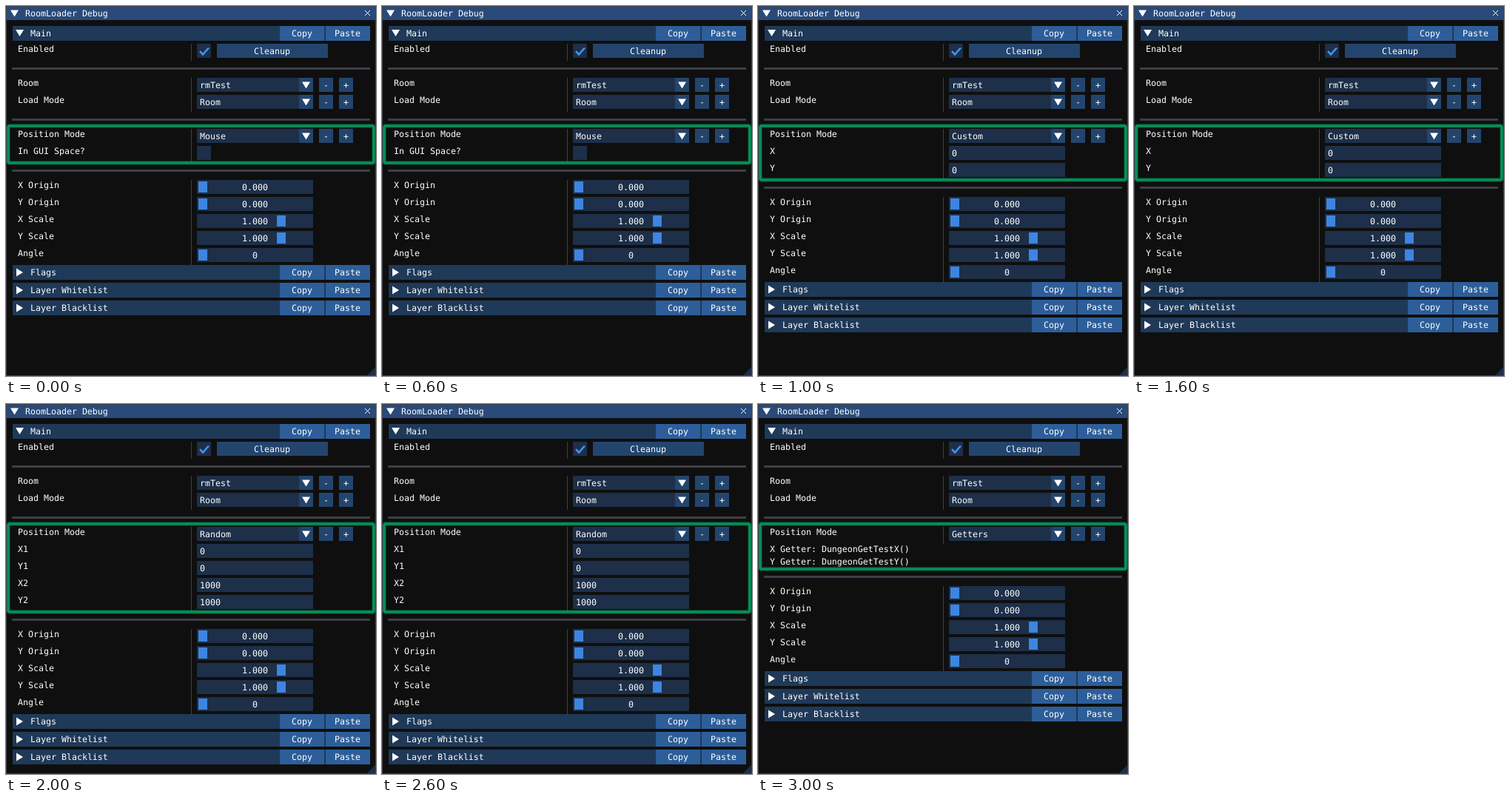
Recreate the animation shown at these times as an HTML page. Size 500 px wide and 500 px high, loop 4000 ms.

```html
<!DOCTYPE html>
<html lang="en">
<head>
<meta charset="utf-8">
<title>Debug panel</title>
<style>
  html, body { margin: 0; width: 100%; height: 100%; overflow: hidden; background: #0f0f0f; }
  svg { display: block; width: 500px; height: 500px; }
  text {
    font: 11.627px "DejaVu Sans Mono", "Liberation Mono", monospace;
    fill: #fff; white-space: pre; text-rendering: geometricPrecision;
  }
</style>
</head>
<body>
<svg id="stage" viewBox="0 0 500 500"></svg>
<script>
const LOOP = 4000;
const C = {
  bg: '#0f0f0f', title: '#294a7a', line: '#3e3e47', header: '#1f3958', tool: '#2d5e99',
  frame: '#1d2f49', button: '#23456d', grab: '#3d85e0', check: '#4296fa', mark: '#05935a'
};
const stage = document.getElementById('stage');

function add(parent, tag, attrs, content) {
  const el = document.createElementNS('http://www.w3.org/2000/svg', tag);
  for (const k in attrs) el.setAttribute(k, attrs[k]);
  if (content !== undefined) el.textContent = content;
  parent.appendChild(el);
  return el;
}
const group = parent => add(parent, 'g', {});
const rect = (p, x, y, width, height, fill) => add(p, 'rect', { x, y, width, height, fill });
const text = (p, x, y, s) => add(p, 'text', { x, y }, s);
const path = (p, d, attrs) => add(p, 'path', { d, fill: '#fff', ...attrs });

const downArrow = (p, x, y) => path(p, `M${x} ${y}h11l-5.5 9z`);
const rightArrow = (p, x, y) => path(p, `M${x} ${y}v11l9-5.5z`);
const label = (p, y, s) => text(p, 16, y + 11, s);
const divider = (p, y) => rect(p, 8, y, 484, 3, C.line);
const column = (p, y, end) => rect(p, 250, y, 1, end - y, C.line);

function button(p, x, y, w, h, s, fill) {
  rect(p, x, y, w, h, fill);
  text(p, Math.floor(x + (w - s.length * 7) / 2), y + 14, s);
}

function header(p, y, s, open) {
  rect(p, 9, y, 483, 20, C.header);
  if (open) downArrow(p, 13, y + 5);
  else rightArrow(p, 14, y + 4.5);
  text(p, 33, y + 14, s);
  button(p, 370, y, 60, 20, 'Copy', C.tool);
  button(p, 432, y, 60, 20, 'Paste', C.tool);
}

function field(p, y, name, value) {
  label(p, y, name);
  rect(p, 258, y, 157, 19, C.frame);
  text(p, 262, y + 14, value);
}

function combo(p, y, name, value) {
  field(p, y, name, value);
  rect(p, 396, y, 19, 19, C.button);
  downArrow(p, 400, y + 5.5);
  button(p, 423, y, 19, 19, '-', C.button);
  button(p, 450, y, 19, 19, '+', C.button);
}

function slider(p, y, name, value, grabX) {
  label(p, y, name);
  rect(p, 258, y, 157, 19, C.frame);
  rect(p, grabX, y + 2, 12, 15, C.grab);
  text(p, 336.5 - value.length * 3.5, y + 14, value);
}

function checkbox(p, y, name, on) {
  label(p, y, name);
  rect(p, 258, y, 19, 19, C.frame);
  if (on) path(p, `M262 ${y + 10}l4 4.5l8-9`, { fill: 'none', stroke: C.check, 'stroke-width': 2.5 });
}

// Each mode lists its own rows and how far they push the rest down.
const modes = [
  { name: 'Mouse', shift: 0, end: 212, rows: p => checkbox(p, 189, 'In GUI Space?', false) },
  { name: 'Custom', shift: 23, end: 235, rows: p => fields(p, ['X', '0'], ['Y', '0']) },
  { name: 'Random', shift: 69, end: 281,
    rows: p => fields(p, ['X1', '0'], ['Y1', '0'], ['X2', '1000'], ['Y2', '1000']) },
  { name: 'Getters', shift: 11, end: 189, rows: p => {
    label(p, 189, 'X Getter: DungeonGetTestX()');
    label(p, 206, 'Y Getter: DungeonGetTestY()');
  } }
];

function fields(p, ...list) {
  list.forEach(([name, value], i) => field(p, 189 + i * 23, name, value));
}

function outline(p, h) {
  const box = (width, opacity) => add(p, 'rect', {
    x: 3, y: 162, width: 494, height: h, rx: 2, fill: 'none',
    stroke: C.mark, 'stroke-width': width, 'stroke-opacity': opacity
  });
  box(6, 0.3);
  box(3.6, 1);
}

function drawTop(p) {
  rect(p, 0, 0, 500, 500, C.bg);
  rect(p, 0, 0, 500, 19, C.title);
  downArrow(p, 6, 5.5);
  text(p, 26, 14, 'RoomLoader Debug');
  path(p, 'M485 6l7 7m0-7l-7 7', { fill: 'none', stroke: '#fff' });

  header(p, 27, 'Main', true);
  column(p, 51, 74);
  checkbox(p, 51, 'Enabled', true);
  button(p, 285, 51, 150, 19, 'Cleanup', C.button);
  divider(p, 83);
  column(p, 97, 143);
  combo(p, 97, 'Room', 'rmTest');
  combo(p, 120, 'Load Mode', 'Room');
  divider(p, 152);
}

function drawBottom(p) {
  divider(p, 221);
  column(p, 235, 350);
  slider(p, 235, 'X Origin', '0.000', 260);
  slider(p, 258, 'Y Origin', '0.000', 260);
  slider(p, 281, 'X Scale', '1.000', 366);
  slider(p, 304, 'Y Scale', '1.000', 366);
  slider(p, 327, 'Angle', '0', 260);
  ['Flags', 'Layer Whitelist', 'Layer Blacklist'].forEach((s, i) => header(p, 350 + i * 24, s));
}

drawTop(stage);
const bottom = group(stage);
drawBottom(bottom);

const panels = modes.map(m => {
  const g = group(stage);
  column(g, 166, m.end);
  combo(g, 166, 'Position Mode', m.name);
  m.rows(g);
  outline(g, 50 + m.shift);
  return g;
});

path(stage, 'M499 488v11h-11z', { fill: '#1b304b' });
add(stage, 'rect', { x: 0.5, y: 0.5, width: 499, height: 499, fill: 'none', stroke: C.line });

let shown = -1;
function draw(now) {
  const i = Math.floor((now % LOOP) / (LOOP / modes.length));
  if (i !== shown) {
    shown = i;
    panels.forEach((g, k) => g.setAttribute('visibility', k === i ? 'visible' : 'hidden'));
    bottom.setAttribute('transform', `translate(0 ${modes[i].shift})`);
  }
}

const start = performance.now();
function tick() {
  draw(performance.now() - start);
  requestAnimationFrame(tick);
}
tick();
</script>
</body>
</html>
```
